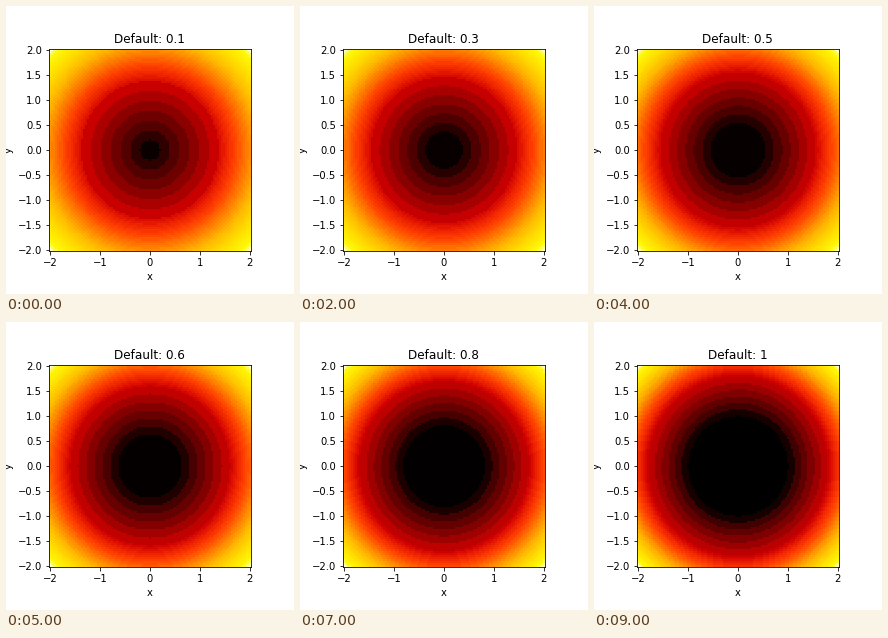
Write a matplotlib script that moves like this. It is 288 by 288 pixels and loops after 10000 ms.

```python
import numpy as np
import matplotlib.pyplot as plt
from matplotlib.animation import FuncAnimation
from matplotlib.colors import LinearSegmentedColormap

FRAMES = 10
EXTENT = 2.0
POINTS = 101

plt.rcParams["font.family"] = "DejaVu Sans"

# Perceptually even ramp: black, red, yellow, white.
fire = LinearSegmentedColormap.from_list("fire", [
    (0.00, "#000000"), (0.10, "#400000"), (0.25, "#7d0000"),
    (0.375, "#b20000"), (0.45, "#d00000"), (0.52, "#ee2400"),
    (0.58, "#ff3e00"), (0.70, "#ff8f00"), (0.77, "#ffba00"),
    (0.87, "#ffe100"), (0.96, "#fffa0a"), (1.00, "#ffffff")], N=1024)

axis = np.linspace(-EXTENT, EXTENT, POINTS)
X, Y = np.meshgrid(axis, axis)
radius = np.hypot(X, Y)


def cone(floor):
    """Banded colours of a cone whose tip is cut flat."""
    z = np.maximum(radius, floor)
    t = (z - floor) / (z.max() - floor)
    # Wide steps through the dark reds, fine steps above.
    first = 0.001 + 0.04 * (1 - floor)
    wide = first + 0.072 * np.arange(7)
    fine = np.linspace(wide[-1], 1, 28)[1:]
    edges = np.concatenate([[0], wide, fine])
    shades = (edges[:-1] + edges[1:]) / 2
    band = np.digitize(t, edges) - 1
    return fire(shades[np.clip(band, 0, len(shades) - 1)])


fig = plt.figure(figsize=(4, 4), dpi=72, facecolor="white")
ax = fig.add_axes([43 / 288, 0.15, 0.7, 0.7])
side = EXTENT + EXTENT / (POINTS - 1)
image = ax.imshow(cone(0.1), origin="lower", interpolation="nearest",
                  extent=[-side, side, -side, side])
ax.set_xticks(np.arange(-2, 3))
ax.set_yticks(np.arange(-2, 2.1, 0.5))
ax.set_xlabel("x")
ax.set_ylabel("y")
title = ax.set_title("Default: 0.1")


def update(i):
    floor = (i + 1) / 10
    image.set_data(cone(floor))
    title.set_text(f"Default: {floor:g}")
    return image, title


anim = FuncAnimation(fig, update, frames=FRAMES, interval=1000,
                     repeat=True, repeat_delay=0, blit=False)
plt.show()
```
